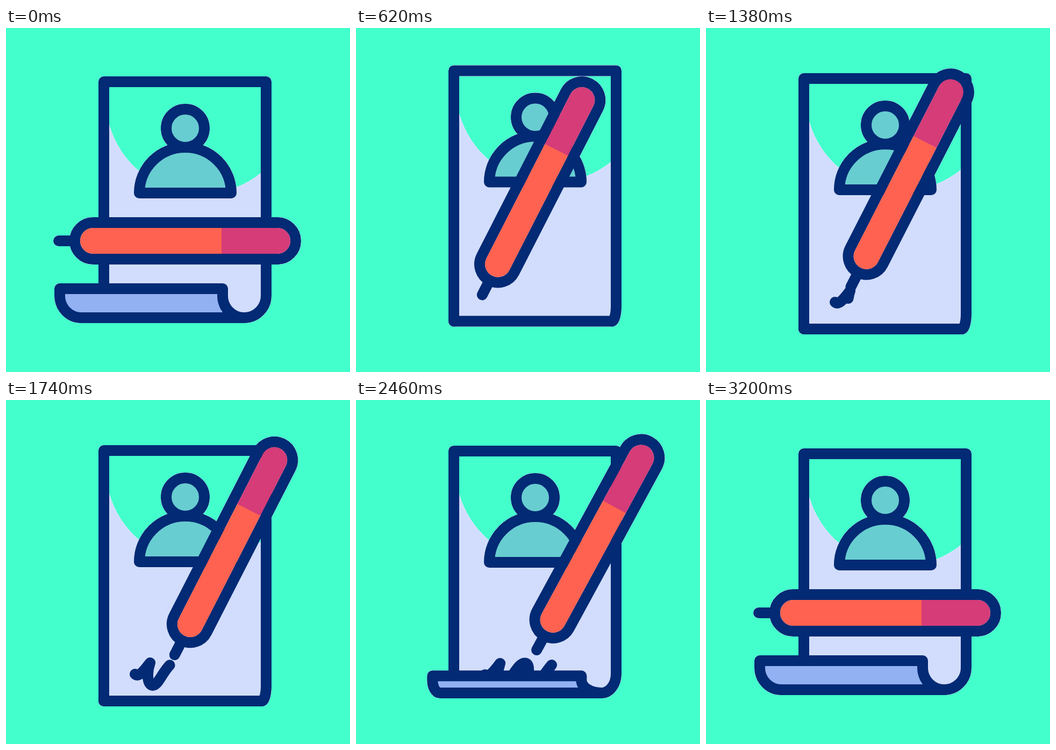
These frames come from a looping animation (640x640 px, 3220 ms). An HTML page:

```html
<!DOCTYPE html>
<html lang="en">
<head>
<meta charset="utf-8">
<title>Signing a document</title>
<style>
  html, body { margin: 0; width: 100%; height: 100%; overflow: hidden; background: #43ffcc; }
  svg { display: block; width: 100%; height: 100%; }
  .ink { stroke: #032a74; stroke-width: 20; stroke-linecap: round; stroke-linejoin: round; fill: none; }
  .skin { fill: #68cdd1; }
  #rays { stroke: #fdcb50; stroke-width: 20; stroke-linecap: round; fill: none; }
</style>
</head>
<body>
<svg viewBox="0 0 640 640">
  <!-- Thin pale rim where the drawing meets the background -->
  <filter id="rim" filterUnits="userSpaceOnUse" x="0" y="0" width="640" height="640" color-interpolation-filters="sRGB">
    <feGaussianBlur in="SourceAlpha" stdDeviation=".7"/>
    <feComponentTransfer result="spread"><feFuncA type="linear" slope="3"/></feComponentTransfer>
    <feFlood flood-color="#eef4fc"/>
    <feComposite in2="spread" operator="in" result="pale"/>
    <feMerge><feMergeNode in="pale"/><feMergeNode in="SourceGraphic"/></feMerge>
  </filter>
  <g filter="url(#rim)">
    <g id="page">
      <path id="sheet" fill="#d2ddfd"/>
      <path id="edge" class="ink"/>
      <path class="ink skin" d="M248 307A85.5 85 0 0 1 419 307Z"/>
      <circle class="ink skin" cx="333.5" cy="186.5" r="35.5"/>
      <g id="rays">
        <path pathLength="1" d="M264 154L243 138"/>
        <path pathLength="1" d="M261 209L240 219"/>
        <path pathLength="1" d="M399 151L422 142"/>
        <path pathLength="1" d="M398 209L417 217"/>
      </g>
      <path id="sign" class="ink" pathLength="1" transform="translate(0 6)"
        d="M240 510C247 517 258 502 268 489C262 506 262 530 273 531C283 531 290 508 305 493C317 483 322 491 321 504C320 518 318 530 328 530C340 530 350 508 364 492"/>
      <path id="strip" class="ink" style="fill:#92b1f2"/>
      <g id="pen">
        <path class="ink" d="M-64 0H-40"/>
        <rect class="ink" x="-34" y="-34" width="411" height="68" rx="34"/>
        <path fill="#ff6250" d="M239.500-24H0A24 24 0 0 0 0 24H239.500Z"/>
        <path fill="#d53c78" d="M239-24H343A24 24 0 0 1 343 24H239Z"/>
      </g>
    </g>
  </g>
</svg>
<script>
const LOOP = 3220;
const $ = id => document.getElementById(id);

// Progress from 0 to 1 between two times: even, cubic in-out, and long-tailed.
const sweep = (t, from, to) => Math.max(0, Math.min(1, (t - from) / (to - from)));
const ease = (t, from, to) => {
  const u = sweep(t, from, to);
  return u < .5 ? 4 * u ** 3 : 1 - 4 * (1 - u) ** 3;
};
const settle = (t, from, to) => {
  const u = sweep(t, from, to);
  return 1 - (1 - u) ** 4 * (1 + 4 * u);
};

// Draws part of a path whose pathLength is 1.
function trim(el, from, to) {
  el.style.display = to - from > .002 ? '' : 'none';
  el.setAttribute('stroke-dasharray', `${to - from} 2`);
  el.setAttribute('stroke-dashoffset', -from);
}

function drawPage(t) {
  const rolled = 1 - ease(t, 160, 504) + ease(t, 2190, 2700);
  const h = 54 * rolled;
  const bottom = 566 - h / 2, top = bottom - h, neck = top + .24 * h;
  const rx = 8 + 33 * rolled, ry = 28 + 13 * rolled, base = 484 - rx;
  const left = Math.min(182, 100 + 1.9 * (54 - h));
  const curl = Math.min(base, 484 - 81 * Math.sin(rolled * Math.PI / 2));
  const foot = 40 * rolled ** 2;
  const right = `V${bottom - ry}A${rx} ${ry} 0 0 1 ${base} ${bottom}`;

  $('edge').setAttribute('d', `M182 ${top}V100H484${right}`);
  $('sheet').setAttribute('d', `M182 131H185A178 178 0 0 0 484 261.500${right}H${curl}V${top}H182Z`);
  $('strip').setAttribute('d', `M${base} ${bottom}H${left + foot}`
    + `A${foot} ${bottom - neck} 0 0 1 ${left} ${neck}V${top}H${curl}V${neck}`
    + `A${base - curl} ${bottom - neck} 0 0 0 ${base} ${bottom}Z`);

  const lift = -54 * ease(t, 160, 390) + 48 * settle(t, 390, 940) + 6 * ease(t, 2330, 2720);
  $('page').setAttribute('transform', `translate(0 ${lift})`);
}

// Rest, raise, write in two and a half waves, then lie down again.
function drawPen(t) {
  const s = sweep(t, 1100, 2180);
  const wave = 18.5 * (Math.cos(5 * Math.PI * s) - 1);
  const x = 162 + 102 * ease(t, 160, 504) + 133 * s - 235 * ease(t, 2118, 3195);
  const y = 396 + 64 * ease(t, 160, 462) + wave - 27 * ease(t, 1940, 3130);
  const tilt = 62.9 * (ease(t, 160, 491) - ease(t, 2318, 3122));
  $('pen').setAttribute('transform', `translate(${x} ${y}) rotate(${-tilt})`);
}

function draw(t) {
  drawPage(t);
  drawPen(t);
  trim($('sign'), 0, t < 2720 ? sweep(t, 1150, 2240) : 0);
  for (const ray of $('rays').children) trim(ray, sweep(t, 2880, 3020), sweep(t, 2740, 2880));
}

const start = performance.now();
function tick() {
  draw((performance.now() - start) % LOOP);
  requestAnimationFrame(tick);
}
tick();
</script>
</body>
</html>
```
